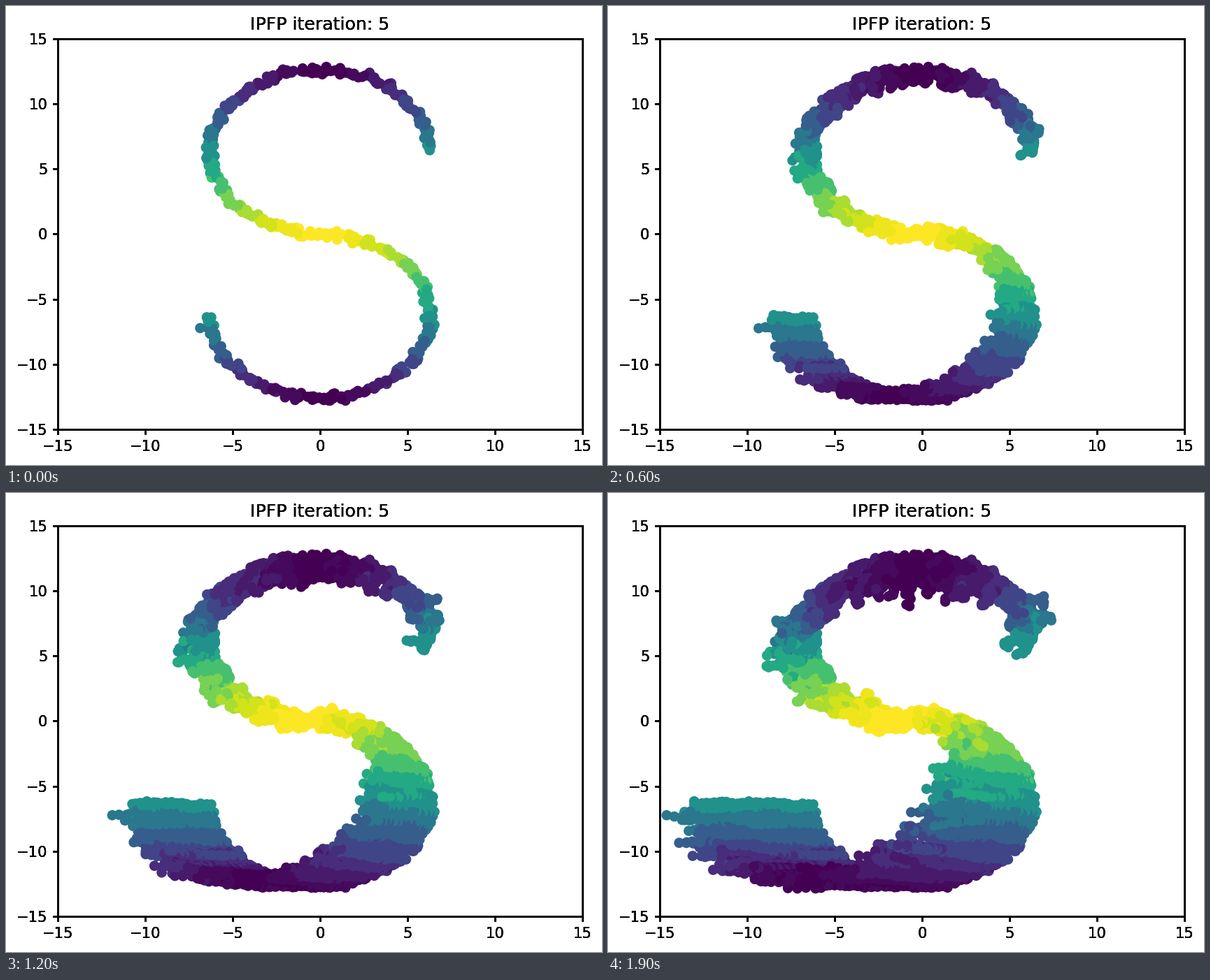
Animation of 852x657 px, one loop 2 s. Source, as a matplotlib script:

```python
import numpy as np
import matplotlib.pyplot as plt
from matplotlib.animation import FuncAnimation

W, H, DPI = 852, 657, 151
STEPS, COUNT = 20, 500
SCALE, BANDS = 6.3, 15
PASSES = 4

rng = np.random.default_rng(4)


def sigmoid(v):
    return 1 / (1 + np.exp(-v))


def s_curve():
    """Noisy points on an S in random order, with their curve parameter."""
    u = (np.arange(COUNT) + rng.uniform(-0.4, 1.4, COUNT)) / COUNT
    t = 3 * np.pi * (np.clip(u, 0, 1) - 0.5)
    rng.shuffle(t)
    points = SCALE * np.column_stack([np.sin(t), np.sign(t) * (np.cos(t) - 1)])
    return t, points + rng.normal(0, 0.15, points.shape)


def band_colors(t):
    """Viridis by cos(t), in bands of equal angle."""
    angle = np.arccos(np.cos(t)) / np.pi
    middle = (np.minimum(np.floor(angle * BANDS), BANDS - 1) + 0.5) / BANDS
    return plt.get_cmap("viridis")((1 + np.cos(np.pi * middle)) / 2)


def total_drift(points):
    """The lower bowl slides left while the top sinks."""
    x, y = points.T
    dx = -0.8 + 0.1 * x - 5.9 * sigmoid(-(y + 3) / 1.8)
    dy = 0.5 + 0.08 * x - 2.6 * sigmoid((y - 8) / 2)
    return np.column_stack([dx, dy])


def random_walk(points):
    y = points[:, 1]
    spread = np.column_stack([np.full(COUNT, 0.12), 0.1 + 0.002 * y])
    kicks = rng.normal(0, 1, (STEPS, COUNT, 2)) * spread
    kicks[0] = 0
    return np.cumsum(kicks, axis=0)


t, start = s_curve()
progress = np.linspace(0, 1, STEPS)[:, None, None]
trail = start + progress * total_drift(start) + random_walk(start)
trail = trail.reshape(-1, 2)
colors = np.tile(band_colors(t), (STEPS, 1))

plt.rcParams.update({
    "font.family": "DejaVu Sans",
    "axes.linewidth": 1.3,
    "xtick.major.width": 1.3,
    "ytick.major.width": 1.3,
})
fig = plt.figure(figsize=(W / DPI, H / DPI), dpi=DPI, facecolor="white")


def add_frame():
    ax = fig.add_axes([74 / W, 1 - 606 / H, 750 / W, 559 / H], facecolor="none")
    ticks = np.arange(-15, 16, 5)
    ax.set(xlim=(-15, 15), ylim=(-15, 15), xticks=ticks, yticks=ticks,
           title="IPFP iteration: 5")
    return ax


# Stacked copies of the frame give its heavy text and lines
axes = [add_frame() for _ in range(PASSES)]
dots = axes[0].scatter(*trail[:COUNT].T, c=colors[:COUNT])


def draw(step):
    n = COUNT * (step + 1)
    dots.set_offsets(trail[:n])
    dots.set_facecolor(colors[:n])
    dots.set_edgecolor(colors[:n])
    return (dots,)


anim = FuncAnimation(fig, draw, frames=STEPS, interval=100, repeat=True,
                     repeat_delay=0, init_func=lambda: draw(0))
plt.show()
```
